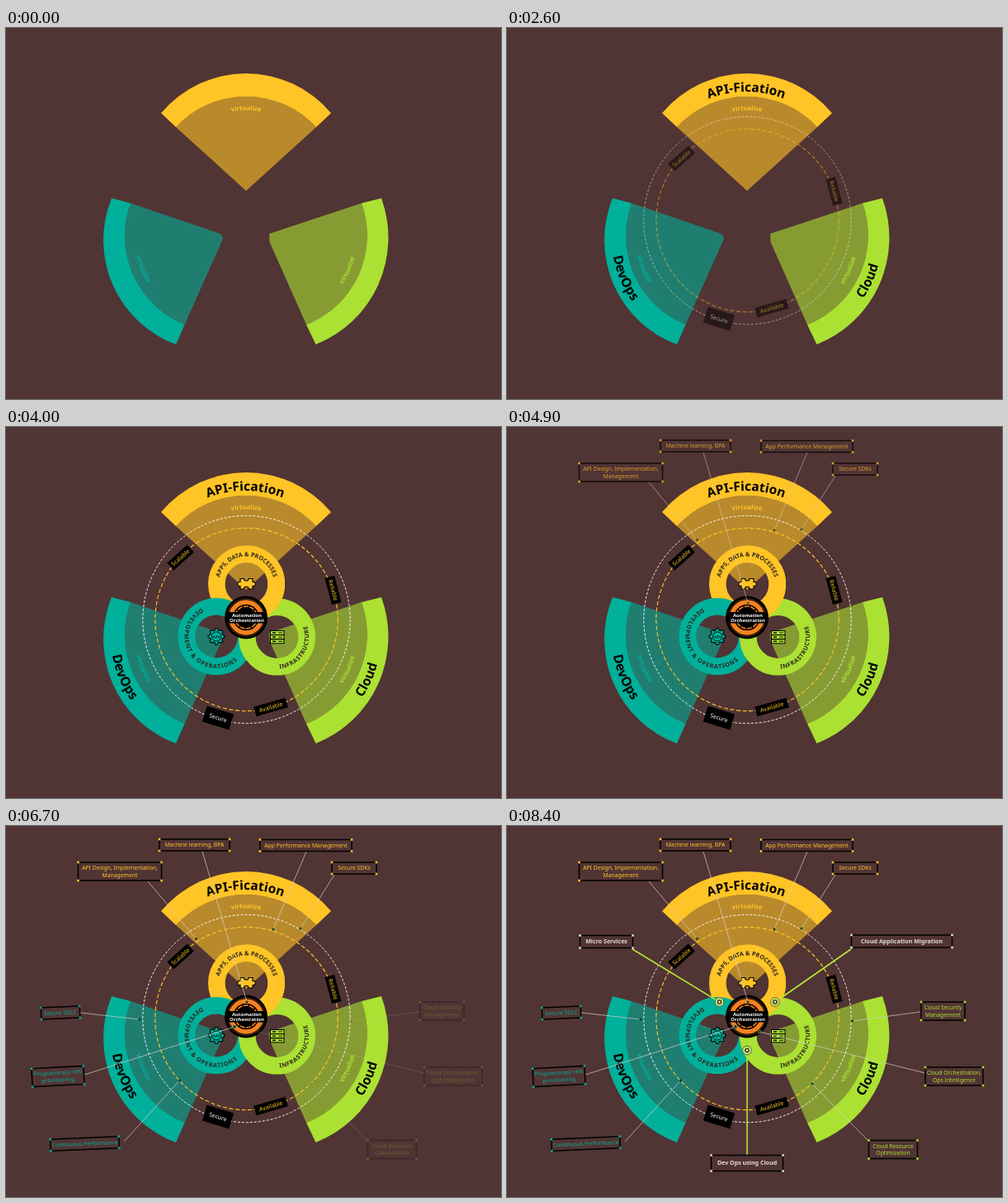
These frames come from a looping animation (600x449 px, 8.9 s). An HTML page:

```html
<!DOCTYPE html>
<html lang="en">
<head>
<meta charset="utf-8">
<title>Automation Orchestration</title>
<style>
  html, body { margin: 0; width: 100%; height: 100%; overflow: hidden; background: #513434; }
  svg { display: block; width: 100vw; height: 100vh; }
  text { font-family: "Noto Sans", "Open Sans", sans-serif; text-anchor: middle; }
</style>
</head>
<body>
<svg id="stage" viewBox="0 0 600 449"></svg>
<script>
const LOOP = 8900, STEP = 200;
const YELLOW = '#ffc425', TEAL = '#00b09a', GREEN = '#abe132', ORANGE = '#f58220', PALE = '#e2dcda';
const INK = '#2e2420';

let pathCount = 0;

const polar = (cx, cy, r, deg) => {
  const a = deg * Math.PI / 180;
  return `${(cx + r * Math.cos(a)).toFixed(2)} ${(cy + r * Math.sin(a)).toFixed(2)}`;
};

// Text centred at an angle; "inward" puts the tops of the letters towards the centre.
function arcText(text, cx, cy, r, angle, size, fill, inward = false, spacing = 0) {
  const id = 'arc' + pathCount++;
  const half = inward ? -125 : 125;
  const from = polar(cx, cy, r, angle - half), to = polar(cx, cy, r, angle + half);
  return `<path id="${id}" fill="none" d="M${from}A${r} ${r} 0 1 ${inward ? 0 : 1} ${to}"/>
    <text font-size="${size}" font-weight="bold" fill="${fill}" letter-spacing="${spacing}">
    <textPath href="#${id}" startOffset="50%">${text}</textPath></text>`;
}

// Corners run clockwise; the apex may be several points.
function wedge(color, apex, outer, inner, radius = 134.5) {
  const [a, b] = outer, [c, d] = inner;
  return `<g fill="${color}">
    <path fill-opacity=".6" d="M${apex}L${c}A116 116 0 0 1 ${d}Z"/>
    <path d="M${a}A${radius} ${radius} 0 0 1 ${b}L${d}A116 116 0 0 0 ${c}Z"/></g>`;
}

const circle = (x, y, r, attrs) => `<circle cx="${x}" cy="${y}" r="${r}" ${attrs}/>`;
const ring = (x, y, color) => circle(x, y, 36.2, `fill="none" stroke="${color}" stroke-width="20.6"`);
const line = (x1, y1, x2, y2, color, width) =>
  `<path d="M${x1} ${y1}L${x2} ${y2}" stroke="${color}" stroke-width="${width}"/>`;

function tag(text, x, y, w, h, angle, color) {
  return `<g transform="translate(${x} ${y}) rotate(${angle})">
    <rect x="${-w / 2}" y="${-h / 2}" width="${w}" height="${h}"/>
    <text y="2.4" font-size="7" font-weight="500" fill="${color}">${text}</text></g>`;
}

// Framed label centred at x, y, with coloured corners.
function box(lines, x, y, w, h, angle, color, bold = false) {
  const size = bold ? 7.1 : 6.8;
  const corners = [-1, 1].flatMap(i => [-1, 1].map(j =>
    `<rect x="${i * w / 2 - 1.3}" y="${j * h / 2 - 1.3}" width="2.6" height="2.6"/>`)).join('');
  const rows = lines.map((row, i) =>
    `<text y="${2.3 + (i - (lines.length - 1) / 2) * 8.6}" font-size="${size}"
      font-weight="${bold ? 'bold' : '500'}">${row}</text>`).join('');
  return `<g transform="translate(${x} ${y}) rotate(${angle})" fill="${color}">
    <rect x="${-w / 2}" y="${-h / 2}" width="${w}" height="${h}" fill="none" stroke="#000" stroke-width="1.5"/>
    ${corners}${rows}</g>`;
}

const pointer = (x1, y1, x2, y2, color) => line(x1, y1, x2, y2, '#d9cfcb', .7) +
  circle(x2, y2, 1.9, `fill="#123a2c" stroke="${color}" stroke-width=".5"`);

const node = (x1, y1, x2, y2) => line(x1, y1, x2, y2, '#b5e839', 1.6) +
  circle(x2, y2, 5.4, `fill="${PALE}" stroke="#3b4a1c" stroke-width=".8"`) +
  circle(x2, y2, 3.6, `fill="${INK}" stroke="#b5e839" stroke-width="1.8"`) +
  circle(x2, y2, 1.4, `fill="${PALE}"`);

function gear() {
  let d = '';
  for (let i = 0; i < 32; i++) {
    d += (i ? 'L' : 'M') + polar(255, 253.5, i % 4 < 2 ? 10 : 7.8, i * 11.25 - 5.6);
  }
  return `<path d="${d}Z" fill="${TEAL}" stroke="#000" stroke-width="1.1"/>` +
    circle(255, 253.5, 5.6, `fill="${TEAL}" stroke="#000" stroke-width=".9"`) +
    `<text x="255" y="255.7" font-size="6" font-weight="bold">&lt;/&gt;</text>`;
}

const servers = () => [0, 1, 2].map(i => {
  const y = 246.5 + i * 5.2;
  return `<rect x="320.5" y="${y}" width="16.5" height="5" fill="${GREEN}" stroke="#000"/>` +
    line(323, y + 2.5, 327, y + 2.5, '#000', 1.4) + line(330, y + 2.5, 335, y + 2.5, '#000', .9);
}).join('');

const puzzle = () => `<path fill="${YELLOW}" stroke="#000" stroke-width="1.1"
  d="M284 183.5h4.5a2.7 2.7 0 1 0 5.5 0h5v4a2.6 2.6 0 1 1 0 5v3.5h-5a2.7 2.7 0 1 0-5.5 0H284v-3.5a2.6 2.6 0 1 1 0-5Z"/>`;

const base =
  wedge(YELLOW, '291 197', ['188 103', '394 103'], ['206 120', '376 120']) +
  wedge(TEAL, '258 248.5L261 250L263 255', ['206 383', '128 206'], ['216.5 359', '151 212']) +
  wedge(GREEN, '319.5 259L319 249', ['455 206', '375.5 383'], ['431 212', '364 359'], 139) +
  arcText('virtualize', 291, 199, 99.5, -90, 7.6, YELLOW) +
  arcText('virtualize', 258, 253, 102.5, 157, 7.6, TEAL, true) +
  arcText('virtualize', 323, 253, 102.5, 24, 7.6, GREEN, true);

const titles =
  arcText('API-Fication', 290, 203, 126, -90, 15.5, '#000') +
  arcText('DevOps', 255, 255, 128, 157, 15.8, '#000', true) +
  arcText('Cloud', 329, 256, 125, 24.7, 15.8, '#000', true);

const orbits =
  circle(291.5, 233, 125.7, 'fill="none" stroke="#fff" stroke-width=".95" stroke-dasharray="3 2"') +
  circle(291.5, 233, 110.7, `fill="none" stroke="${YELLOW}" stroke-width="1.15" stroke-dasharray="5 2.6"`) +
  tag('Scalable', 211.5, 158, 33, 12, -42, YELLOW) +
  tag('Reliable', 396.5, 197.5, 33, 12, 75, YELLOW) +
  tag('Available', 321, 339, 40, 12, -16, YELLOW) +
  tag('Secure', 257, 352, 34, 20, 17, '#fff');

// The three rings interlock: yellow passes under teal and over green.
const hub =
  ring(291.5, 190, YELLOW) + ring(255, 253.5, TEAL) + ring(328.5, 254, GREEN) +
  `<path d="M291.5 153.8a36.2 36.2 0 0 1 0 72.4" fill="none" stroke="${YELLOW}" stroke-width="20.6"/>` +
  arcText('APPS, DATA &amp; PROCESSES', 291.5, 190, 33.5, -90, 7.2, INK) +
  arcText('DEVELOPMENT &amp; OPERATIONS', 255, 253.5, 38.6, 145, 7.2, INK, true, .95) +
  arcText('INFRASTRUCTURE', 328.5, 254, 38.6, 32, 7.2, INK, true, .6) +
  puzzle() + gear() + servers() + circle(291, 230.5, 26, '');

const core =
  circle(291, 230.5, 22.5, `fill="none" stroke="#7d4319" stroke-width=".8"`) +
  circle(291, 230.5, 18.5, `fill="none" stroke="${ORANGE}" stroke-width="5.5"`) +
  circle(291, 230.5, 13.5, `fill="none" stroke="${ORANGE}" stroke-width="1.6" stroke-dasharray="6 1.5"`) +
  `<rect x="268" y="224" width="46" height="13.5"/>
  <g font-size="6" font-weight="bold" fill="#fff">
    <text x="292" y="230">Automation</text><text x="292" y="236.3">Orchestration</text></g>`;

const apiNotes =
  pointer(238, 31, 292, 213, YELLOW) + pointer(364, 31, 324, 125, YELLOW) +
  pointer(172, 67, 230.5, 136.5, YELLOW) + pointer(398, 59, 357, 124, YELLOW) +
  box(['Machine learning, BPA'], 228.5, 23, 85, 14, 0, YELLOW) +
  box(['App Performance Management'], 363.5, 23.5, 111, 14, 0, YELLOW) +
  box(['API Design, Implementation,', 'Management'], 138, 55, 101, 22, 0, YELLOW) +
  box(['Secure SDKs'], 422, 51, 54, 14, 0, YELLOW);

const devNotes =
  pointer(90, 226, 162, 234, TEAL) + pointer(95, 301, 277, 243, TEAL) + pointer(143, 382, 210.5, 308, TEAL) +
  box(['Secure SDLC'], 66, 226, 47, 14, -2.5, TEAL) +
  box(['Programmatic HW', 'provisioning'], 63, 303, 63, 22, -3, TEAL) +
  box(['Continuous Performance'], 95.5, 384.5, 83, 14, -2.5, TEAL);

const cloudNotes =
  pointer(501, 225, 418.5, 236, GREEN) + pointer(507, 299, 306, 249, GREEN) + pointer(438, 381, 370, 312, GREEN) +
  box(['Cloud Security', 'Management'], 528.5, 224, 53, 22, 0, GREEN) +
  box(['Cloud Orchestration,', 'Ops Intelligence'], 542, 303, 70, 22, 0, GREEN) +
  box(['Cloud Resource', 'Optimization'], 468, 391.5, 59, 22, 0, GREEN);

const linkNotes =
  node(152, 149, 257.5, 213) + node(417, 149, 325, 213) + node(291, 398, 291, 271.5) +
  box(['Micro Services'], 120.5, 140, 64, 15, 0, PALE, true) +
  box(['Cloud Application Migration'], 478.5, 139.5, 122, 15, 0, PALE, true) +
  box(['Dev Ops using Cloud'], 291, 408, 87, 19, 0, PALE, true);

const layers = [
  { art: base, start: -STEP, steps: 1 },
  { art: titles, start: 1000, steps: 3 },
  { art: orbits, start: 2400, steps: 4 },
  { art: hub, start: 3200, steps: 5, ease: 1.3 },
  { art: core, start: 3400, steps: 4 },
  { art: apiNotes, start: 4500, steps: 4 },
  { art: devNotes, start: 5600, steps: 4 },
  { art: cloudNotes, start: 6700, steps: 4 },
  { art: linkNotes, start: 7800, steps: 4 },
];

const stage = document.getElementById('stage');
stage.innerHTML = layers.map(layer => `<g>${layer.art}</g>`).join('');
const groups = [...stage.children];

// Each layer fades in with hard 200 ms steps.
function draw(t) {
  layers.forEach(({ start, steps, ease = 1 }, i) => {
    const done = Math.floor((t - start) / STEP) + 1;
    groups[i].setAttribute('opacity', Math.max(0, Math.min(1, done / steps)) ** ease);
  });
}

const begin = performance.now();
function tick() {
  draw((performance.now() - begin) % LOOP);
  requestAnimationFrame(tick);
}
tick();
</script>
</body>
</html>
```
